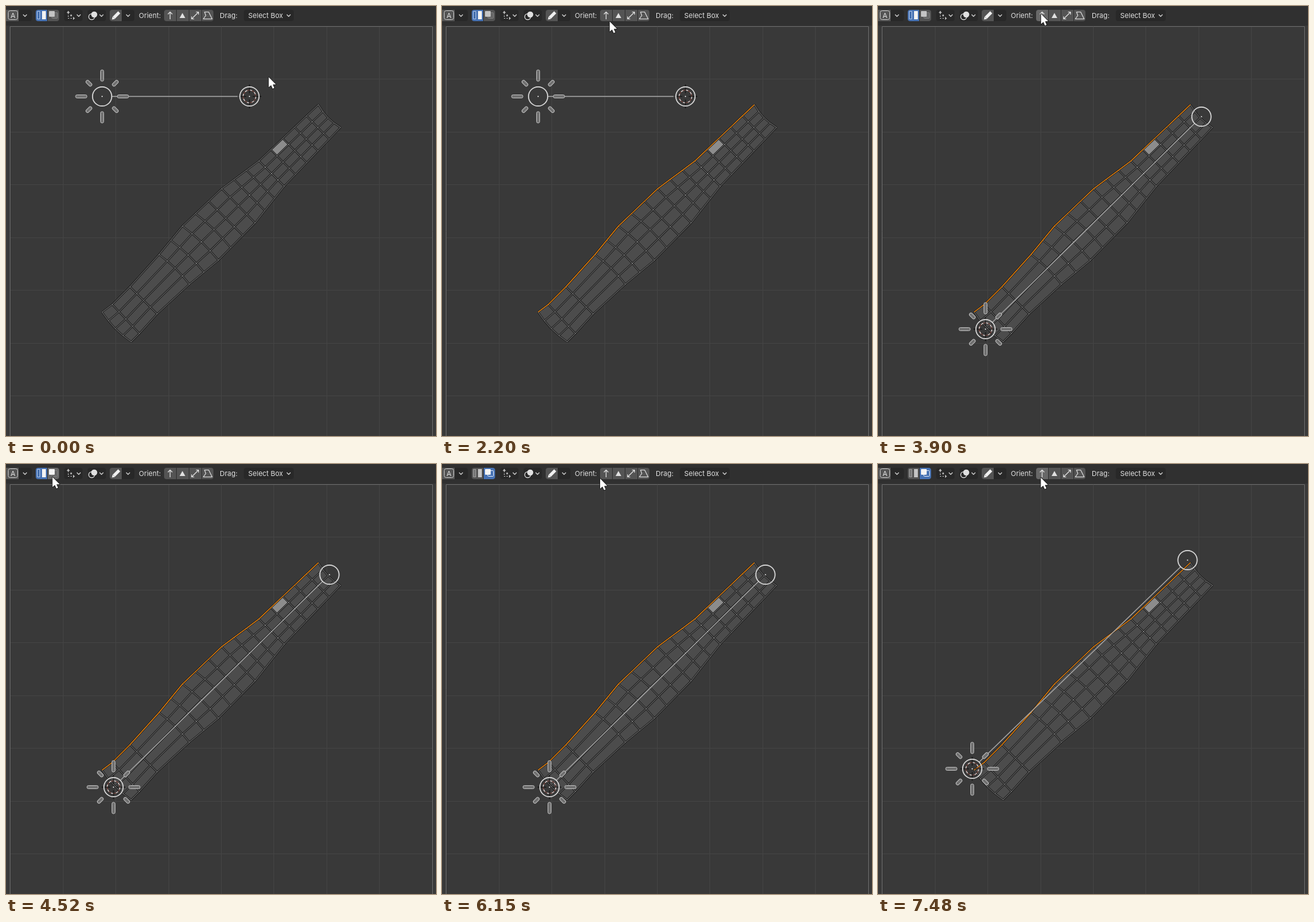
These frames come from a looping animation (680x680 px, 8000 ms). An HTML page with a canvas:

```html
<!DOCTYPE html>
<html lang="en">
<head>
<meta charset="utf-8">
<title>UV editor gradient gizmo</title>
<style>
  html, body { margin: 0; height: 100%; overflow: hidden; background: #393939; }
  canvas { display: block; }
</style>
</head>
<body>
<canvas id="stage" width="680" height="680"></canvas>
<script>
const ctx = document.getElementById('stage').getContext('2d');
const LOOP = 8000, STEP = 80;
const SELECT_AT = 950, MODE_AT = 4980;
const LIGHT = '#e0e0e0', BUTTON = '#545454', FIELD = '#282828', ACTIVE = '#4772b3';

// The strip's corners: both ends of a cross edge, and the even subdivisions up to it
const STRIPS = 4;
const CORNERS = [
  { left: [152, 484], right: [198, 531], cuts: 1 },
  { left: [168, 472], right: [211, 518], cuts: 1 },
  { left: [196, 444], right: [239, 487], cuts: 1 },
  { left: [242, 393], right: [290, 440], cuts: 1 },
  { left: [279, 348], right: [336, 402], cuts: 2 },
  { left: [341, 289], right: [394, 343], cuts: 3 },
  { left: [400, 245], right: [440, 285], cuts: 3 },
  { left: [494, 156], right: [529, 192], cuts: 5 },
];

// Pointer glides; power shapes the ease in and out
const START = [415, 112];
const MOVES = [
  { from: 80, until: 560, to: [370, 265], power: 2.2 },
  { from: 1720, until: 2440, to: [259.5, 12], power: 4.6 },
  { from: 3900, until: 4520, to: [73, 20], power: 2.5 },
  { from: 5750, until: 6230, to: [279, 23], power: 1 },
  { from: 6390, until: 6630, to: [257, 23], power: 1 },
  { from: 7090, until: 7170, to: [257, 21], power: 1 },
];

const GIZMOS = [
  { from: 0, sun: [152, 143], end: [385, 143], pivot: 'end' },
  { from: 2750, sun: [170, 511], end: [511.5, 175], pivot: 'sun' },
  { from: 7400, sun: [149, 482], end: [489.5, 152], pivot: 'sun' },
];

const mix = (a, b, s) => [a[0] + (b[0] - a[0]) * s, a[1] + (b[1] - a[1]) * s];
const ease = (u, p) => u < .5 ? .5 * (2 * u) ** p : 1 - .5 * (2 - 2 * u) ** p;

function pointerAt(t) {
  let pos = START;
  for (const { from, until, to, power } of MOVES) {
    if (t < from) break;
    const gaps = Math.round((until - from) / STEP);
    const step = Math.floor((t - from) / (until - from) * gaps + 1e-6) + 1;
    pos = mix(pos, to, ease(Math.min(1, step / (gaps + 1)), power));
  }
  return pos;
}

function trace(points, close) {
  ctx.beginPath();
  points.forEach(p => ctx.lineTo(p[0], p[1]));
  if (close) ctx.closePath();
}
function line(points, color, width, close) {
  trace(points, close);
  ctx.strokeStyle = color;
  ctx.lineWidth = width;
  ctx.stroke();
}
function fill(points, color) {
  trace(points, true);
  ctx.fillStyle = color;
  ctx.fill();
}
function box(x, y, w, h, r, color, border) {
  ctx.beginPath();
  ctx.roundRect(x, y, w, h, r);
  if (color) { ctx.fillStyle = color; ctx.fill(); }
  if (border) { ctx.strokeStyle = border; ctx.lineWidth = 1; ctx.stroke(); }
}
function circle([x, y], r, color, width) {
  ctx.beginPath();
  ctx.arc(x, y, r, 0, 2 * Math.PI);
  if (width) { ctx.strokeStyle = color; ctx.lineWidth = width; ctx.stroke(); }
  else { ctx.fillStyle = color; ctx.fill(); }
}
function label(text, x) {
  ctx.fillStyle = LIGHT;
  ctx.fillText(text, x, 19);
}

const ends = CORNERS.flatMap(({ left, right, cuts }, i) => {
  const before = CORNERS[Math.max(0, i - 1)];
  return Array.from({ length: cuts }, (_, k) => {
    const s = (k + 1) / cuts;
    return [mix(before.left, left, s), mix(before.right, right, s)];
  });
});
// Both end rows bow towards the lower left and the middle ones away from it
const rows = ends.map(([a, b], row) => Array.from({ length: STRIPS + 1 }, (_, col) => {
  const s = col / STRIPS;
  const [x, y] = mix(a, b, s);
  const bend = row % (ends.length - 1) === 0 ? -1 : row > 2 && row < 7 ? .7 : 0;
  const k = bend * Math.sin(Math.PI * s);
  return [x + 2.2 * k, y - 2.8 * k];
}));
const rails = rows[0].map((_, col) => rows.map(row => row[col]));
const outline = [...rails[0], ...rows.at(-1), ...[...rails[STRIPS]].reverse(), ...[...rows[0]].reverse()];

function drawGrid() {
  ctx.fillStyle = '#393939';
  ctx.fillRect(0, 0, 680, 680);
  ctx.fillStyle = '#444444';
  for (let i = 0; i < 7; i++) {
    const d = i * 83.45;
    ctx.fillRect(Math.round(89.6 + d), 33, 1, 647);
    ctx.fillRect(7, Math.round(115.3 + d), 667, 1);
  }
  box(6.5, 32.5, 668, 700, 0, null, '#6b6b6b');
}

function drawMesh(selected) {
  fill(outline, '#4c4c4c');
  fill([rows[12][0], rows[13][0], rows[13][1], rows[12][1]], '#8c8c8c');
  ctx.lineJoin = 'round';
  const edges = [...rows, ...rails];
  edges.forEach(edge => line(edge, '#1c1c1c', 2.8));
  edges.forEach(edge => line(edge, '#7c7c7c', 1));
  if (selected) line(rails[0], '#f08000', 1.2);
}

function drawGizmo({ sun, end, pivot }) {
  const inset = 15 / Math.hypot(end[0] - sun[0], end[1] - sun[1]);
  line([mix(sun, end, inset), mix(end, sun, inset)], '#a6a6a6', 1.5);

  ctx.save();
  ctx.translate(...(pivot === 'sun' ? sun : end));
  circle([0, 0], 10, '#7a4038', 1.2);
  ctx.setLineDash([10 * Math.PI / 8]);
  circle([0, 0], 10, '#e4e4e4', 1.2);
  ctx.setLineDash([]);
  for (let i = 0; i < 4; i++) {
    ctx.rotate(Math.PI / 2);
    line([[5, 0], [19, 0]], '#0c0c0c', 1);
  }
  ctx.restore();

  ctx.save();
  ctx.translate(...sun);
  for (let i = 0; i < 8; i++) {
    box(24, -2.5, i % 2 ? 11 : 18, 5, 2.3, '#707070', '#bcbcbc');
    ctx.rotate(Math.PI / 4);
  }
  ctx.restore();

  for (const p of [sun, end]) {
    circle(p, 15.2, '#d8d8d8', 1.7);
    circle(p, 1, LIGHT);
  }
}

function field(x, w, arrowX) {
  box(x, 6, w, 18, 4, FIELD);
  line([[arrowX - 3, 13.5], [arrowX, 16.5], [arrowX + 3, 13.5]], '#c8c8c8', 1.3);
}

function drawModeIcons(second) {
  box(49.5, 8.5, 4, 12, 0, second ? '#777777' : '#426cab', second ? '#999999' : '#a9c2e8');
  box(57, 8, 6, 13, 0, second ? '#c4c4c4' : '#f2f2f2');
  box(72.5, 10.5, 9, 9, 1, second ? ACTIVE : '#666666', second ? '#dce6f5' : '#7e7e7e');
}

function drawPivotIcon() {
  ctx.setLineDash([2, 2]);
  line([[98.5, 11], [98.5, 19.5], [107, 19.5]], '#bdbdbd', 1.2);
  ctx.setLineDash([]);
  fill([[96, 11], [98.5, 7.5], [101, 11]], '#bdbdbd');
  fill([[106, 17], [109, 19.5], [106, 22]], '#bdbdbd');
  circle([103, 15], 1.4, '#bdbdbd');
}

function drawOrientIcons() {
  line([[259.5, 21], [259.5, 10]], LIGHT, 1.2);
  line([[256, 13], [259.5, 9.5], [263, 13]], LIGHT, 1.2);
  fill([[274.5, 19], [279, 11], [283.5, 19]], LIGHT);
  line([[294, 20], [304, 10]], LIGHT, 1.2);
  line([[300.5, 9.5], [304.5, 9.5], [304.5, 13.5]], LIGHT, 1.2);
  line([[293.5, 16.5], [293.5, 20.5], [297.5, 20.5]], LIGHT, 1.2);
  line([[314, 9.5], [320.5, 9.5], [326, 20.5], [312, 20.5], [316, 15]], LIGHT, 1.1, true);
}

function drawToolbar(t, [mx, my]) {
  const hover = x => mx >= x && mx < x + 19 && my >= 5 && my < 23;
  const button = (x, w, r, active) =>
    box(x, 6, w, 18, r, active ? ACTIVE : hover(x) ? '#686868' : BUTTON);
  const leftEnd = [4, 0, 0, 4], rightEnd = [0, 4, 4, 0];
  ctx.fillStyle = '#303030';
  ctx.fillRect(0, 0, 680, 31);

  field(-5, 46, 30);
  button(0, 20, 0);
  box(3.5, 7.5, 15, 14, 3, null, '#c8c8c8');
  label('A', 7.3);

  const second = t >= MODE_AT;
  button(47, 18, leftEnd, !second);
  button(66, 18, rightEnd, second);
  drawModeIcons(second);
  box(68, 8, 9, 9, 1, second || hover(66) ? '#f4f4f4' : '#c4c4c4');

  field(92, 29, 115);
  drawPivotIcon();

  field(129, 29, 151);
  circle([135.5, 17], 4.7, LIGHT, 1.3);
  circle([139.5, 13.5], 4.8, LIGHT);

  field(164, 39, 193);
  button(164, 19, leftEnd);
  fill([[167.5, 21.5], [168.5, 16.8], [172.2, 20.5]], '#f0f0f0');
  line([[170.5, 18.5], [179, 10]], '#f0f0f0', 4.6);

  label('Orient:', 210);
  const pressed = GIZMOS.some(g => t >= g.from - STEP && t < g.from);
  for (let i = 0; i < 4; i++)
    button(250 + i * 20, i < 3 ? 19 : 18, i === 0 ? leftEnd : i < 3 ? 0 : rightEnd, i === 0 && pressed);
  drawOrientIcons();

  label('Drag:', 338);
  field(376, 79, 447);
  label('Select Box', 383);
}

function drawPointer(pos) {
  ctx.save();
  ctx.translate(...pos);
  const arrow = [[.5, .5], [.5, 16.5], [4.2, 13.2], [6.7, 18.8], [9.3, 17.6], [6.9, 12.2], [11.8, 12]];
  line(arrow, '#151515', 1.6, true);
  fill(arrow, '#ffffff');
  ctx.restore();
}

function draw(now) {
  const t = now % LOOP;
  const pointer = pointerAt(t);
  ctx.font = '11px Inter, "DejaVu Sans", sans-serif';
  drawGrid();
  drawMesh(t >= SELECT_AT);
  drawGizmo(GIZMOS.findLast(g => t >= g.from));
  drawToolbar(t, pointer);
  drawPointer(pointer);
}

const began = performance.now();
function tick() {
  draw(performance.now() - began);
  requestAnimationFrame(tick);
}
tick();
</script>
</body>
</html>
```
